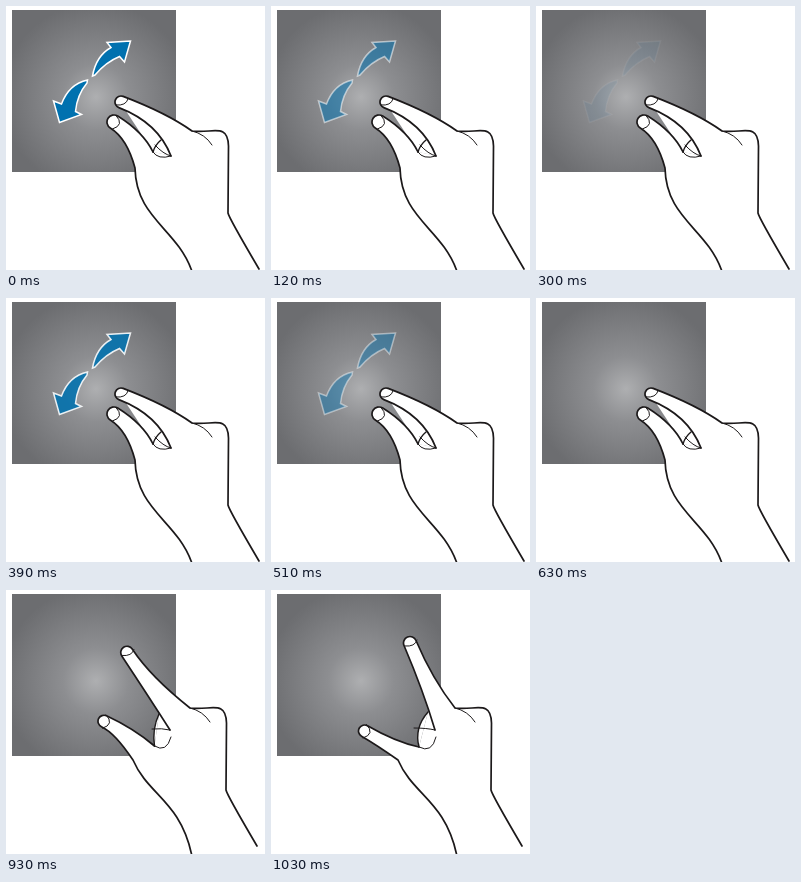
These frames come from a looping animation (259 by 264 pixels, 1.93 s). An HTML page with a canvas:

```html
<!DOCTYPE html>
<html lang="en">
<head>
<meta charset="utf-8">
<title>Spread two fingers</title>
<style>
html, body { margin: 0; width: 100%; height: 100%; overflow: hidden; background: #fff; }
canvas { display: block; width: 259px; height: 264px; }
</style>
</head>
<body>
<canvas id="stage"></canvas>
<script>
const W = 259, H = 264, LOOP = 1930, STEP = 30;
const INK = '#1c191a', BLUE = '#0071af';
const canvas = document.getElementById('stage');
const dpr = window.devicePixelRatio || 1;
canvas.width = W * dpr;
canvas.height = H * dpr;
const ctx = canvas.getContext('2d');
ctx.scale(dpr, dpr);
ctx.lineCap = 'round';

// Fingers: tip centre, angle towards the base in degrees, tip radius,
// and how far the lower and upper edges follow that angle.
const pinch = {
  index: [115, 96, 21, 6, 42, 47], thumb: [108, 116, 32, 7, 20, 30],
  root: [165, 150], knuckle: [186, 125], heel: [129, 162], crotch: [147, 146],
  palm: [170, 222, 130, 212], gap: [120, 105],
  web: [155, 134], webBend: [149, 139], pad: [152, 154], padEnd: [165, 150]
};
const open = {
  index: [103, 72, 46, 6, 52, 25], thumb: [102.5, 121.5, 20, 6, 12, 27],
  root: [164, 140], knuckle: [184, 118], heel: [127, 170], crotch: [149, 155],
  palm: [174, 211, 142, 205], gap: [149, 126],
  web: [149, 126], webBend: [149, 140], pad: [160, 163], padEnd: [165, 147]
};
const spread = {
  ...open,
  index: [139, 53, 67, 6.5, 50, 42], thumb: [93.5, 141, 30, 6, 18, 33],
  crotch: [148, 157], gap: [157, 122],
  web: [157, 122], webBend: [143, 138], pad: [161, 164]
};

function mix(a, b, k) {
  const out = {};
  for (const part in a) out[part] = a[part].map((v, i) => v + (b[part][i] - v) * k);
  return out;
}
const halfway = mix(open, spread, 0.5);

// From the current point along the lower edge, round the tip and back to `end`.
function finger([x, y, deg, r, low, high], end) {
  const a = deg * Math.PI / 180, c = Math.cos(a), s = Math.sin(a);
  const lx = x - s * r, ly = y + c * r, ux = x + s * r, uy = y - c * r;
  ctx.quadraticCurveTo(lx + c * low, ly + s * low, lx, ly);
  ctx.arc(x, y, r, a + Math.PI / 2, a + Math.PI * 1.5);
  ctx.quadraticCurveTo(ux + c * high, uy + s * high, ...end);
}

function back([x, y]) {
  ctx.bezierCurveTo(x + 20, y + 3, x + 36, y - 9, x + 36.5, y + 15);
  ctx.lineTo(x + 36, y + 82);
  ctx.quadraticCurveTo(x + 37, y + 87, x + 67, y + 138);
}

// `cross` tells whether the open wrist is bridged or skipped.
function outline(h, cross) {
  ctx.beginPath();
  ctx.moveTo(...h.root);
  finger(h.index, h.knuckle);
  back(h.knuckle);
  ctx[cross](185.5, H);
  ctx.bezierCurveTo(...h.palm, ...h.heel);
  finger(h.thumb, h.crotch);
}

function arc(from, bend, to, width, filled) {
  ctx.beginPath();
  ctx.moveTo(...from);
  ctx.quadraticCurveTo(...bend, ...to);
  if (filled) ctx.fill();
  ctx.lineWidth = width;
  ctx.stroke();
}

function drawHand(h) {
  const near = ([x, y], dx, dy) => [x + dx, y + dy];
  ctx.fillStyle = '#fff';
  ctx.strokeStyle = INK;
  ctx.lineJoin = 'round';

  outline(h, 'lineTo');
  ctx.fill();
  ctx.beginPath();
  for (const p of [h.gap, h.knuckle, h.root, h.padEnd, h.crotch]) ctx.lineTo(...p);
  ctx.fill();

  arc(h.web, h.webBend, h.crotch, 1.4, true);
  arc(h.crotch, h.pad, h.padEnd, 1, true);
  arc(h.webBend, near(h.root, -8, -2), h.root, 1);
  arc(h.knuckle, near(h.knuckle, 13, 3), near(h.knuckle, 20, 14), 1);
  arc(near(h.index, 7, -3), near(h.index, 5, 4), near(h.index, -5, 3), 1);
  arc(near(h.thumb, 2, -6.5), near(h.thumb, 11, 3), near(h.thumb, -1.5, 7), 1);

  outline(h, 'moveTo');
  ctx.lineWidth = 1.7;
  ctx.stroke();
}

function drawPanel() {
  const glow = ctx.createRadialGradient(90, 91, 0, 90, 91, 94);
  glow.addColorStop(0, '#aeafb1');
  glow.addColorStop(0.35, '#8d8e91');
  glow.addColorStop(1, '#6c6d70');
  ctx.fillStyle = glow;
  ctx.fillRect(6, 4, 164, 162);
}

const arrows = [
  new Path2D('M86.5 70Q90 50 105 41.5L101 36.5L124.5 35L118.5 56L113.5 50.5Q100 56 89 69Z'),
  new Path2D('M81.5 74Q63 78 55.5 98L47.5 95L53.5 116.5L75.5 108.5L69.5 105.5Q71 89 81 77Z')
];

function drawArrows(alpha) {
  ctx.globalAlpha = alpha;
  ctx.fillStyle = BLUE;
  ctx.strokeStyle = '#fff';
  ctx.lineWidth = 1.5;
  ctx.lineJoin = 'miter';
  for (const a of arrows) {
    ctx.fill(a);
    ctx.stroke(a);
  }
  ctx.globalAlpha = 1;
}

function poseAt(t) {
  if (t < 830) return pinch;
  if (t < 930) return open;
  return t < 1030 ? halfway : spread;
}

// The arrows flash every twelve steps and fade, then stay hidden.
function arrowAlpha(t) {
  const step = Math.floor(t / STEP);
  return step < 21 ? (1 - (step % 12) / 12) ** 1.5 : 0;
}

function draw(t) {
  ctx.fillStyle = '#fff';
  ctx.fillRect(0, 0, W, H);
  drawPanel();
  const alpha = arrowAlpha(t);
  if (alpha > 0) drawArrows(alpha);
  drawHand(poseAt(t));
}

const start = performance.now();
function tick() {
  draw((performance.now() - start) % LOOP);
  requestAnimationFrame(tick);
}
tick();
</script>
</body>
</html>
```
